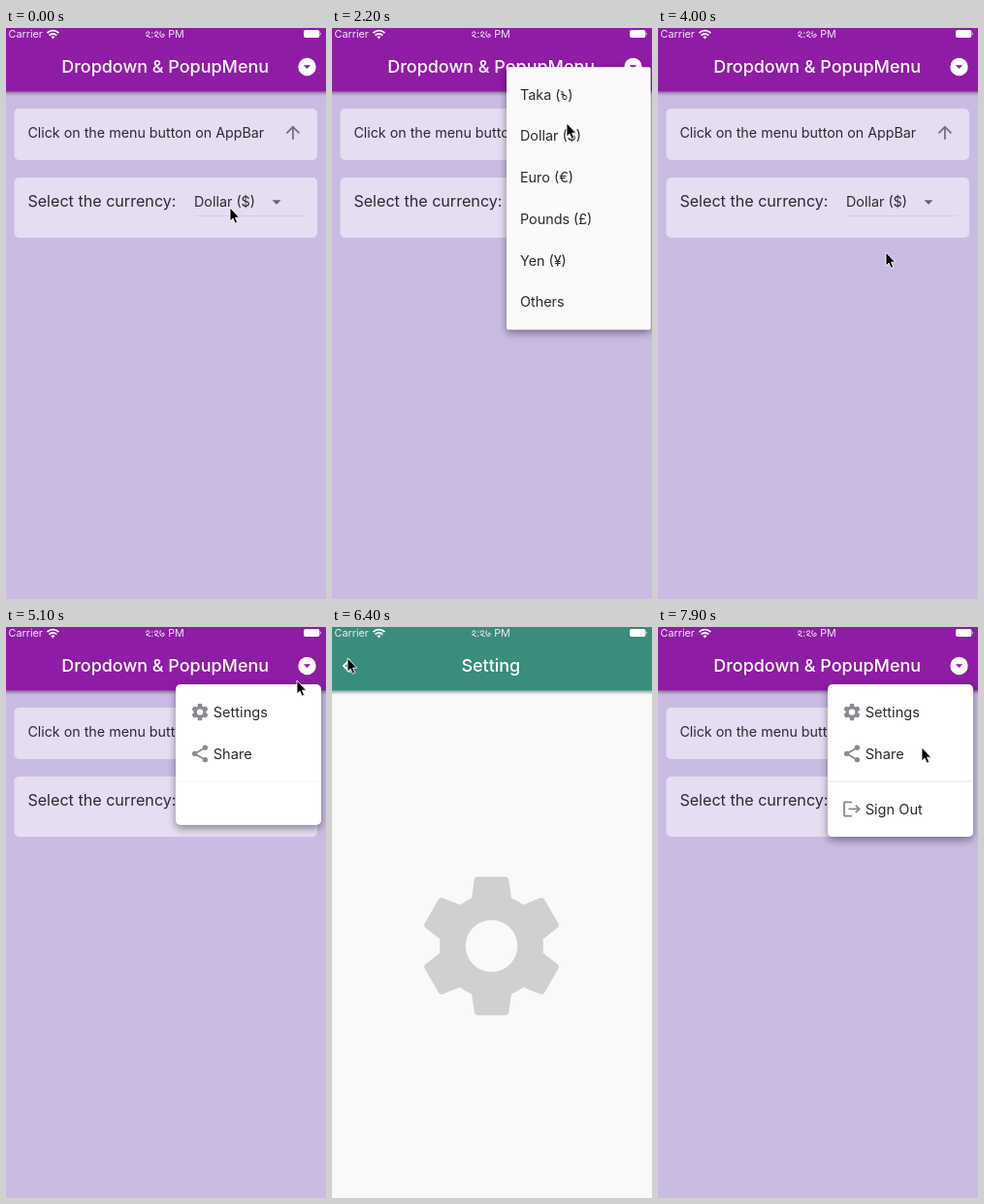
Animation, 330 px wide and 588 px high, one loop 8 s. Source, as an HTML page:

```html
<!DOCTYPE html>
<html lang="en">
<head>
<meta charset="utf-8">
<title>Dropdown and popup menu</title>
<style>
  html, body { margin: 0; width: 100%; height: 100%; overflow: hidden; background: #cabbe3; }
  svg { display: block; width: 330px; height: 588px; }
  text { font-family: Inter, Roboto, sans-serif; font-size: 14.35px; fill: #2d2a31; white-space: pre; }
  .title { font-size: 17.95px; font-weight: 500; fill: #fff; }
  .entry text { font-size: 14.6px; }
  .status text { font-size: 10.8px; fill: #f3e6f6; }
  .line { fill: none; stroke-linecap: round; stroke-linejoin: round; }
</style>
</head>
<body>
<svg id="stage" viewBox="0 0 330 588" width="330" height="588">
  <defs>
    <filter id="barShadow" x="-5%" y="-20%" width="110%" height="150%">
      <feDropShadow dx="0" dy="2" stdDeviation="1.8" flood-color="#000" flood-opacity=".36"/>
    </filter>
    <filter id="menuShadow" filterUnits="userSpaceOnUse" x="120" y="0" width="260" height="460">
      <feDropShadow dx="0" dy="3.5" stdDeviation="4" flood-color="#000" flood-opacity=".42"/>
    </filter>
    <path id="taka" class="line" stroke="#2d2a31" stroke-width=".95"
      d="M.2 -8H2V-2.2Q2 0 4 0Q6 0 6 -2.2Q6 -4.4 4 -4.4Q2.9 -4.4 2 -3.4M.2 -5.4H3.4"/>
    <path id="two" class="line" stroke="#f3e6f6" stroke-width="1" d="M.3 -4.2q0 -1.7 1.7 -1.7q1.7 0 1.7 1.5q0 1.6 -3.4 2.6L4.4 0"/>
    <path id="six" class="line" stroke="#f3e6f6" stroke-width="1" d="M.7 -6Q-.5 -2.6 1.1 -.9Q2.6 .5 4.3 -.9Q5.5 -2.6 4 -3.6Q2.2 -4 2.6 -2.1"/>
  </defs>

  <g id="home">
    <rect width="330" height="588" fill="#cabbe3"/>
    <rect x="-4" y="-10" width="338" height="75.5" fill="#8e1fa4" filter="url(#barShadow)"/>
    <text class="title" x="57.3" y="46.2">Dropdown &amp; PopupMenu</text>
    <circle cx="310.5" cy="40" r="9.2" fill="#fff"/>
    <path d="M306.8 38.3h7.4l-3.7 3.7z" fill="#8e1fa4"/>
    <g fill="#e5ddf1">
      <rect x="8.5" y="83" width="312.5" height="53" rx="5"/>
      <rect x="8.5" y="154" width="312.5" height="62" rx="5"/>
    </g>
    <text x="22.4" y="112.7" style="font-size:14.28px">Click on the menu button on AppBar</text>
    <path transform="translate(285.2 97) scale(.892)" fill="#77717e"
      d="M4 12l1.41 1.41L11 7.83V20h2V7.83l5.58 5.59L20 12l-8-8-8 8z"/>
    <text x="22.4" y="183.8" style="font-size:16.12px">Select the currency:</text>
    <text id="value" x="194" y="184.4"></text>
    <path d="M274.5 177.3h9l-4.5 4.5z" fill="#67616e"/>
    <path d="M194 193.5h114" stroke="#d3cadd" stroke-width=".8"/>
  </g>

  <g id="setting">
    <rect width="330" height="588" fill="#f9f9f9"/>
    <rect x="-4" y="-10" width="338" height="75.5" fill="#398d7c" filter="url(#barShadow)"/>
    <text class="title" x="133.5" y="46.2">Setting</text>
    <path class="line" d="M18 34l-6 6 6 6" stroke="#fff" stroke-width="2"/>
    <g id="bigGear" transform="translate(164.5 328.5) scale(7.43)" fill="#d0d0d0"></g>
  </g>

  <g id="dropdown">
    <rect id="dropBox" x="180" width="148.6" rx="2" fill="#fafafa" filter="url(#menuShadow)"/>
    <circle id="ripple" fill="#000" fill-opacity=".09"/>
    <g id="dropItems"></g>
  </g>

  <g id="popup">
    <rect id="popBox" y="59" rx="5" fill="#fff" filter="url(#menuShadow)"/>
    <g class="entry">
      <g id="smallGear" transform="translate(200 87.6) scale(.892)" fill="#8e8992"></g>
      <text x="213.7" y="92.7">Settings</text>
    </g>
    <g class="entry">
      <g transform="translate(189.3 119.7) scale(.892)" fill="#8e8992">
        <path d="M18 5L6 12l12 7" fill="none" stroke="#8e8992" stroke-width="2"/>
        <circle cx="18" cy="5" r="3"/><circle cx="6" cy="12" r="3"/><circle cx="18" cy="19" r="3"/>
      </g>
      <text x="213.7" y="135.5">Share</text>
    </g>
    <g class="entry"><path d="M175 159h150" stroke="#e6e4e7"/></g>
    <g class="entry">
      <path transform="translate(189.3 176.7) scale(.892)" fill="#8e8992"
        d="M17 7l-1.41 1.41L18.17 11H8v2h10.17l-2.58 2.58L17 17l5-5zM4 5h8V3H4c-1.1 0-2 .9-2 2v14c0 1.1.9 2 2 2h8v-2H4V5z"/>
      <text x="213.7" y="192.5">Sign Out</text>
    </g>
  </g>

  <g class="status">
    <text x="2.6" y="9.9">Carrier</text>
    <g fill="none" stroke="#fff" stroke-width="1.9">
      <path d="M42.4 5.1a8.4 8.4 0 0 1 12 0M44.6 7.6a5.3 5.3 0 0 1 7.6 0"/>
    </g>
    <path d="M48.4 11.4l-2 -2.1a2.8 2.8 0 0 1 4 0z" fill="#fff"/>
    <use href="#two" x="144.3" y="9.7"/>
    <text x="149.2" y="9.9">:</text>
    <use href="#two" x="153" y="9.7"/>
    <use href="#six" x="158.5" y="9.7"/>
    <text x="167.2" y="9.9">PM</text>
    <rect x="307" y="2" width="16.4" height="8" rx="2" fill="#fff"/>
    <path d="M324.2 4.4q1.6 1.6 0 3.2z" fill="#fff"/>
  </g>

  <path id="cursor" d="M0 0V14L3.1 11.1 5.3 16.2 7.7 15.2 5.5 10.2H9.7Z" fill="#000" stroke="#fff" stroke-width=".9"/>
</svg>

<script>
const LOOP = 8000, FADE = 300, WIDTH = 330;
const ITEM = 42.7, PAD = 7.1;
const MENU_HEIGHT = 6 * ITEM + 2 * PAD;
const OPTIONS = ["Taka (৳)", "Dollar ($)", "Euro (€)", "Pounds (£)", "Yen (¥)", "Others"];

const dropdowns = [
  { open: 150, close: 880, top: 108, selected: 1, tap: [230, 340] },
  { open: 1600, close: 2450, top: 40.2, selected: 5, tap: [243, 102] }
];
const popups = [{ open: 4900, close: 5650 }, { open: 7300, close: 9000 }];
const PUSH = 5650, POP = 6700, SLIDE = 400;

// time, x, y of the pointer tip
const pointer = [
  [0, 231, 185], [300, 231, 185], [750, 228, 341], [1000, 228, 341],
  [1450, 234, 180], [1700, 234, 180], [2150, 242, 98], [2550, 242, 98],
  [3400, 235, 231], [4050, 235, 231], [4550, 307, 44], [4950, 307, 44],
  [5100, 300, 55], [5450, 236, 86], [5700, 236, 86], [6300, 16, 32],
  [6750, 16, 32], [7200, 307, 42], [7400, 307, 42], [7800, 272, 124], [LOOP, 272, 124]
];

const $ = id => document.getElementById(id);
const clamp = v => Math.min(1, Math.max(0, v));
const interval = (v, from, to) => clamp((v - from) / (to - from));
const lerp = (a, b, u) => a + (b - a) * u;
const smooth = u => u * u * (3 - 2 * u);
const easeOut = u => 1 - (1 - u) ** 3.5;

function set(node, attrs) {
  for (const key in attrs) node.setAttribute(key, attrs[key]);
}
function make(parent, tag, attrs) {
  const node = document.createElementNS("http://www.w3.org/2000/svg", tag);
  set(node, attrs);
  return parent.appendChild(node);
}

function gearPath() {
  let d = "";
  for (let k = 0; k < 6; k++) {
    const c = Math.cos(k * Math.PI / 3), s = Math.sin(k * Math.PI / 3);
    const at = (x, y) => `${(x * c - y * s).toFixed(3)} ${(x * s + y * c).toFixed(3)} `;
    d += (k ? "A7.2 7.2 0 0 1 " : "M") + at(-2.75, -6.65)
      + "L" + at(-2.39, -9.19) + "Q" + at(-2.33, -9.6) + at(-1.92, -9.6)
      + "L" + at(1.92, -9.6) + "Q" + at(2.33, -9.6) + at(2.39, -9.19)
      + "L" + at(2.75, -6.65);
  }
  return d + "ZM3.6 0A3.6 3.6 0 1 0 -3.6 0A3.6 3.6 0 1 0 3.6 0Z";
}
for (const id of ["bigGear", "smallGear"])
  make($(id), "path", { d: gearPath(), "fill-rule": "evenodd" });

const items = OPTIONS.map((label, i) => {
  const row = make($("dropItems"), "g", {});
  const y = PAD + ITEM * (i + .5) + 5.1;
  const [before, after] = label.split("৳");
  make(row, "text", { x: 194, y }).textContent = before;
  if (after) {
    make(row, "use", { href: "#taka", x: 236, y });
    make(row, "text", { x: 243.2, y }).textContent = after;
  }
  return row;
});
const entries = [...document.querySelectorAll(".entry")];

const active = (list, t) => list.find(m => t >= m.open && t < m.close + FADE);
const routeValue = (m, t) => t < m.close ? clamp((t - m.open) / FADE) : 1 - clamp((t - m.close) / FADE);

function show(node, on) {
  node.style.display = on ? "" : "none";
  return on;
}

function drawDropdown(t) {
  const m = active(dropdowns, t);
  if (!show($("dropdown"), m)) return;
  const closing = t >= m.close, v = routeValue(m, t);
  const grow = closing ? 1 : interval(v, .25, .5);
  const start = PAD + ITEM * m.selected;
  const top = lerp(start, 0, grow), bottom = lerp(start + ITEM, MENU_HEIGHT, grow);
  $("dropdown").setAttribute("opacity", closing ? interval(v, .75, 1) : interval(v, 0, .25));
  set($("dropBox"), { y: m.top + top, height: bottom - top });
  $("dropItems").setAttribute("transform", `translate(0 ${m.top})`);
  const unit = .5 / (OPTIONS.length + 1.5);
  items.forEach((row, i) => {
    const from = .5 + (i + 1) * unit;
    row.setAttribute("opacity", i === m.selected ? 1 : interval(v, from, Math.min(1, from + 1.5 * unit)));
  });
  const age = t - m.close + 60;
  set($("ripple"), { cx: m.tap[0], cy: m.tap[1], r: age > 0 ? 4 + age * .125 : 0 });
}

function drawPopup(t) {
  const m = active(popups, t);
  if (!show($("popup"), m)) return;
  const v = routeValue(m, t), u = t < m.close ? v : clamp(v * 1.5);
  const unit = 1 / (entries.length + 1.5);
  const width = 150 * interval(u, 0, unit);
  const height = 157 * interval(u, 0, unit * entries.length);
  $("popup").setAttribute("opacity", interval(u, 0, 1 / 3));
  set($("popBox"), { x: 325 - width, width, height });
  entries.forEach((entry, i) => {
    const from = (i + 1) * unit;
    entry.setAttribute("opacity", interval(u, from, Math.min(1, from + 1.5 * unit)));
  });
}

function drawPages(t) {
  const p = t < POP ? easeOut(clamp((t - PUSH) / SLIDE)) : 1 - easeOut(clamp((t - POP) / SLIDE));
  $("home").setAttribute("transform", `translate(${-WIDTH / 3 * p} 0)`);
  if (show($("setting"), p > 0))
    $("setting").setAttribute("transform", `translate(${WIDTH * (1 - p)} 0)`);
  const chosen = t >= dropdowns[0].close && t < dropdowns[1].close ? 5 : 1;
  $("value").textContent = OPTIONS[chosen];
}

function drawPointer(t) {
  const i = pointer.findIndex(k => k[0] > t);
  const [t0, x0, y0] = pointer[i - 1], [t1, x1, y1] = pointer[i];
  const u = smooth((t - t0) / (t1 - t0));
  $("cursor").setAttribute("transform", `translate(${lerp(x0, x1, u)} ${lerp(y0, y1, u)})`);
}

function draw(t) {
  drawPages(t);
  drawDropdown(t);
  drawPopup(t);
  drawPointer(t);
}

const began = performance.now();
function tick() {
  draw((performance.now() - began) % LOOP);
  requestAnimationFrame(tick);
}
tick();
</script>
</body>
</html>
```
